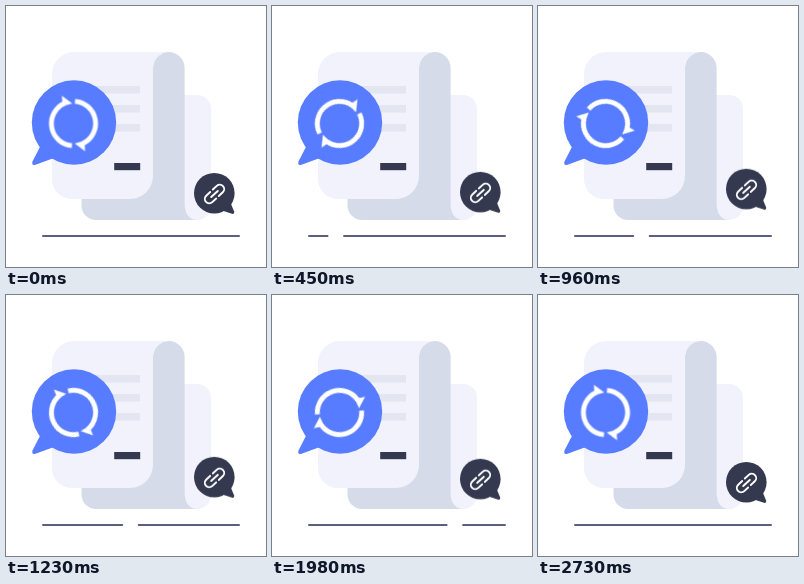
Write an HTML page without scripts that moves like this. It is 260 px wide and 261 px high and loops after 2790 ms.

```html
<!DOCTYPE html>
<html lang="en">
<head>
<meta charset="utf-8">
<title>Document sync</title>
<style>
  html, body { margin: 0; width: 100%; height: 100%; overflow: hidden; background: #fff; }
  svg { display: block; width: 100%; height: 100%; }

  .sheet { fill: #f1f2fb; }
  .fold { fill: #d5dbe9; }
  .text { fill: #e3e6f1; }
  .dark { fill: #343950; }
  .blue { fill: #587cff; }

  /* 91 steps of 30 ms, then a short hold */
  .spin, .ground { animation: 2790ms steps(91, end) infinite; }
  .spin { animation-name: spin; }
  .ground {
    animation-name: slide;
    fill: none;
    stroke: #5a5f7f;
    stroke-width: 2;
    stroke-linecap: round;
    stroke-dasharray: 196 16.5;
  }
  .bob { animation: bob 2790ms ease-in-out infinite; }

  @keyframes spin {
    from { transform: rotate(0deg); }
    97.85%, to { transform: rotate(360deg); }
  }
  @keyframes slide {
    from { stroke-dashoffset: 212.5px; }
    97.85%, to { stroke-dashoffset: 0px; }
  }
  @keyframes bob {
    from, 97.85%, to { transform: translateY(0); }
    50% { transform: translateY(-5.3px); }
  }
</style>
</head>
<body>
<svg viewBox="0 0 260 261">
  <defs>
    <g id="arrow">
      <path d="M1.5 -22.1A22.1 22.1 0 0 1 9.3 20" fill="none" stroke="#fff" stroke-width="4.9"/>
      <path d="M11.6 27.8L1.2 19.9L11 17.2Z" fill="#fff"/>
    </g>
    <path id="hook" d="M-1.8 -4.4H-7.2a4.4 4.4 0 0 0 0 8.8H-1.8"/>
  </defs>

  <!-- paper -->
  <rect class="sheet" x="150" y="89" width="55" height="125" rx="14"/>
  <path class="fold" d="M147 62a15.8 16 0 0 1 31.6 0V198C178.6 207 183 214 191 214H90A14.5 14.5 0 0 1 75.5 199.500V165H147Z"/>
  <path class="sheet" d="M68 46H163A16 16 0 0 0 147 62V170a23 23 0 0 1 -23 23H66a20 20 0 0 1 -20 -20V68a22 22 0 0 1 22 -22Z"/>
  <g class="text">
    <rect x="85" y="80" width="49" height="7.5"/>
    <rect x="85" y="99" width="49" height="7.5"/>
    <rect x="85" y="118" width="49" height="7.5"/>
  </g>
  <rect class="dark" x="108.2" y="157" width="26" height="7.2"/>

  <!-- sync bubble -->
  <g class="blue">
    <circle cx="68" cy="116.5" r="42.2"/>
    <path d="M35.500 138L26.600 155.300Q25.200 160 29.500 158.800L48 152Z"/>
  </g>
  <g transform="translate(67.5 117.5)">
    <g class="spin">
      <use href="#arrow"/>
      <use href="#arrow" transform="rotate(180)"/>
    </g>
  </g>

  <!-- link bubble -->
  <g class="bob">
    <g class="dark">
      <circle cx="208.3" cy="187.2" r="20.3"/>
      <path d="M225 198L228.2 205.8Q228.6 208.4 226 207.8L216 204.5Z"/>
    </g>
    <g transform="translate(208.5 188) rotate(-43)" fill="none" stroke="#fff" stroke-width="1.9" stroke-linecap="round">
      <use href="#hook"/>
      <use href="#hook" transform="rotate(180)"/>
      <path d="M-4.500 0H4.500"/>
    </g>
  </g>

  <path class="ground" d="M37 230H233"/>
</svg>
</body>
</html>
```
